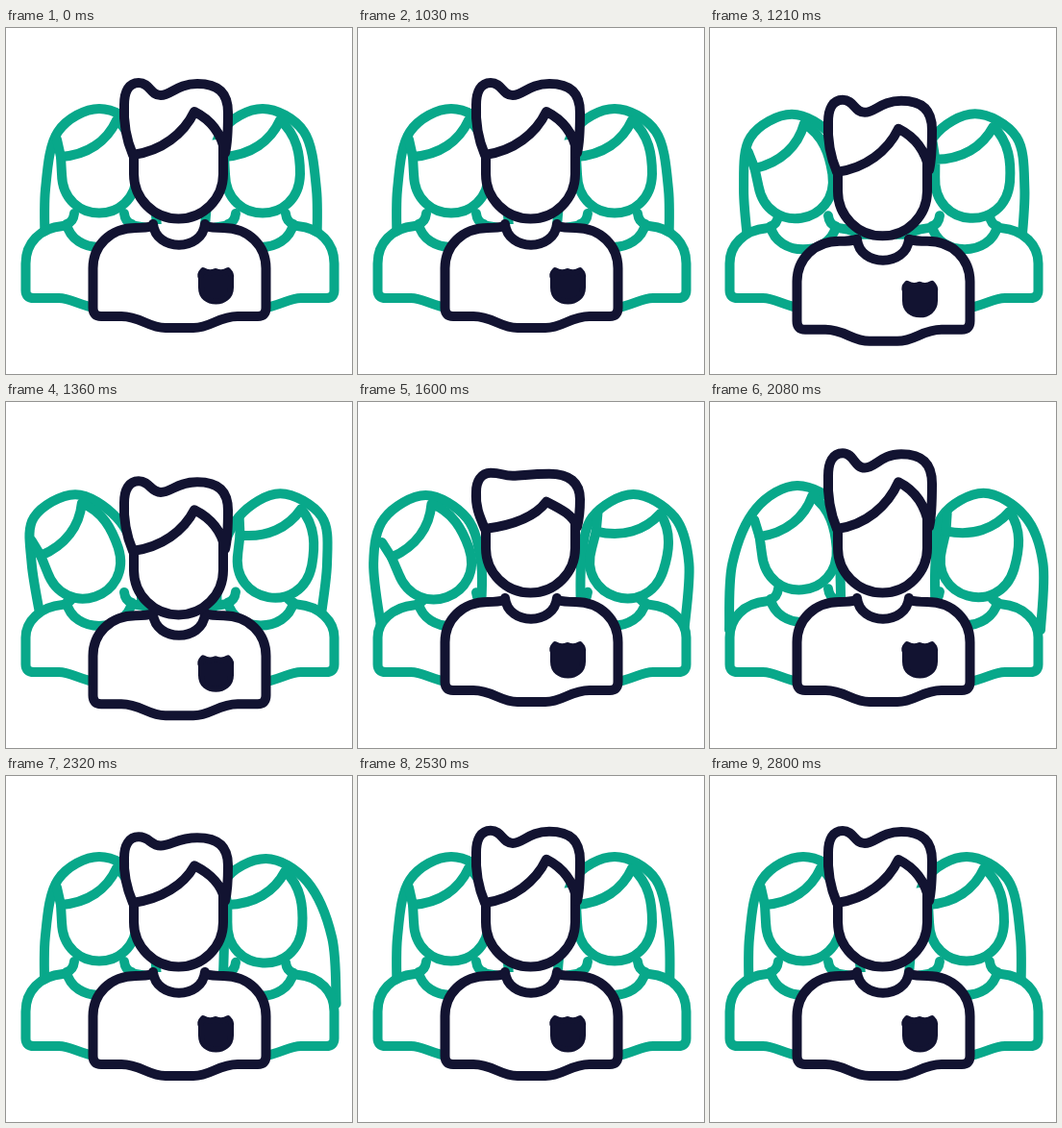
Animation of 360 by 360 pixels, one loop 2.83 s. Source, as an HTML page with a canvas:

```html
<!DOCTYPE html>
<html lang="en">
<head>
<meta charset="utf-8">
<title>Team</title>
<style>
  html, body { margin: 0; width: 100%; height: 100%; overflow: hidden; background: #fff; }
  canvas { display: block; width: 360px; height: 360px; }
</style>
</head>
<body>
<canvas id="stage"></canvas>
<script>
const LOOP = 2830, START = 1030, GREEN = '#08a88a', DARK = '#121331';
const canvas = document.getElementById('stage');
const ctx = canvas.getContext('2d');
const ratio = window.devicePixelRatio || 1;
canvas.width = canvas.height = 360 * ratio;

const path = d => new Path2D(d);

// Smooth step from 0 to 1 between two times
function ease(t, from, to) {
  const u = Math.min(1, Math.max(0, (t - from) / (to - from)));
  return u * u * (3 - 2 * u);
}

// Out and back again
const swing = (t, a, b, c, d) => ease(t, a, b) - ease(t, c, d);

function at(x, y, draw) {
  ctx.save();
  ctx.translate(x, y);
  draw();
  ctx.restore();
}

function line(p, color) {
  ctx.strokeStyle = color;
  ctx.stroke(p);
}

function shape(p, color) {
  ctx.fillStyle = '#fff';
  ctx.fill(p);
  line(p, color);
}

// Smooth curve through points
function spline(pts) {
  const s = new Path2D();
  const pt = i => pts[Math.min(pts.length - 1, Math.max(0, i))];
  s.moveTo(...pts[0]);
  for (let i = 0; i < pts.length - 1; i++) {
    const [a, b, c, d] = [pt(i - 1), pt(i), pt(i + 1), pt(i + 2)];
    const lead = n => b[n] + (c[n] - a[n]) / 6;
    const tail = n => c[n] - (d[n] - b[n]) / 6;
    s.bezierCurveTo(lead(0), lead(1), tail(0), tail(1), ...c);
  }
  return s;
}

const women = [
  { centre: 97, body: 97, side: -1, dx: -19, dy: 13, turn: -20, turnTime: 390, back: 1770 },
  { centre: 267, body: 265, side: 1, dx: 14, dy: 12, turn: 18, turnTime: 620, back: 1990 }
];
const face = path('M-40 -16L-39 2C-38 56 38 56 39 2C39 -18 36 -39 18 -54C8 -32 -12 -18 -40 -16Z');
const temple = path('M-40 -16L-44 -34');

// Body around x = 0; the shoulders sink with the head
function womanBody(sag) {
  const y = 206 + sag;
  const half = k => `C${k * 62} ${y + 2} ${k * 76.5} ${y + 18} ${k * 76.5} 245`;
  return path(`M-38 ${y}${half(-1)}V273Q-76.5 281 -68 281H-42C-29 281 -21 289 0 292` +
    `C21 289 29 281 42 281H68Q76.5 281 76.5 273V245C76.5 ${y + 18} 62 ${y + 2} 38 ${y}`);
}

const womanCollar = path('M-26 193Q-27 202 -34 204C-27 236 27 236 34 204Q27 202 26 193');

function hair(w, dx, dy, drag) {
  const sway = dx + drag;
  const strand = k => {
    const outer = k === w.side;
    return [
      [w.centre + k * (outer ? 56 : 61) + (outer ? drag : 0.85 * sway), outer ? 237 : 220],
      [w.centre + k * 56 + 0.7 * sway, 168],
      [w.centre + k * 43 + 1.4 * dx, 108 + dy]
    ];
  };
  return spline([...strand(-1), [w.centre + 1.4 * dx, 84 + dy], ...strand(1).reverse()]);
}

function woman(w, t) {
  const home = w.back + 450;
  const lean = swing(t, START, START + 390, w.back, home);
  const turn = w.turn * swing(t, START, START + w.turnTime, w.back, home);
  const drag = w.side * 21 * swing(t, 1250, 1750, w.back + 310, w.back + 570);
  const dx = w.dx * lean, dy = w.dy * lean, sag = dy * 0.4;
  shape(hair(w, dx, dy, drag), GREEN);
  at(w.body, 0, () => shape(womanBody(sag), GREEN));
  at(w.body, sag, () => shape(womanCollar, GREEN));
  at(w.centre + dx, 150 + dy, () => {
    ctx.rotate(turn * Math.PI / 180);
    shape(face, GREEN);
    line(temple, GREEN);
  });
}

const manBody = path('M153 206Q146 208 135 208C108 208 90.5 227 90.5 250V291Q90.5 300 99 300H120' +
  'C140 300 148 312 166 312H195C213 312 221 300 241 300H262Q270.5 300 270.5 291V250' +
  'C270.5 227 253 208 226 208Q214 208 207 206');
const manCollar = path('M153 204C156 233 204 233 207 204');
const manFace = path('M133 128V152A46.5 46.5 0 0 0 226 152V115');
const badge = path('M205 252Q211 256 218 253Q225 256 231 252Q235 256 234 260V270' +
  'C234 280 226 284.5 218.500 284.5C210 284.5 203 280 203 270V260Q201 256 205 252Z');

function manHair(q) {
  const y = (v, weight = 1) => v + q * weight;
  const top = y(57), dip = y(70, 0.4), hump = y(58);
  return path(`M132 132C126 118 122 ${y(100, 0.5)} 123 ${y(80, 0.8)}C123 ${y(66)} 128 ${top} 138 ${top}` +
    `C150 ${top} 150 ${dip} 161 ${dip}C172 ${dip} 178 ${hump} 199 ${hump}` +
    `C220 ${hump} 231 ${y(67)} 231 ${y(88, 0.8)}C231 ${y(105, 0.4)} 231 118 228 130` +
    `C224 ${y(108, 0.6)} 212 ${y(95)} 196 ${y(87)}C185 ${y(110, 0.5)} 162 128 132 132Z`);
}

// The quiff is squashed by the nod, then springs and settles
function quiffAt(t) {
  const since = Math.max(0, t - 1570);
  const spring = Math.cos(since / 375 * Math.PI) * Math.exp(-since / 720);
  return 18 * spring * swing(t, 1300, 1570, 2320, 2650);
}

function man(t) {
  const bodyY = 17 * swing(t, START, 1280, 1280, 1600);
  const headY = 25 * swing(t, START, 1310, 1310, 1600);
  at(0, bodyY, () => {
    shape(manBody, DARK);
    at(0, headY * 0.12, () => shape(manCollar, DARK));
    ctx.fillStyle = DARK;
    ctx.lineWidth = 6;
    ctx.fill(badge);
    line(badge, DARK);
  });
  at(0, headY, () => {
    shape(manFace, DARK);
    shape(manHair(quiffAt(t)), DARK);
  });
}

function draw(t) {
  ctx.setTransform(ratio, 0, 0, ratio, 0, 0);
  ctx.fillStyle = '#fff';
  ctx.fillRect(0, 0, 360, 360);
  ctx.lineCap = ctx.lineJoin = 'round';
  ctx.lineWidth = 10;
  women.forEach(w => woman(w, t));
  man(t);
}

const begin = performance.now();
function tick() {
  draw((performance.now() - begin) % LOOP);
  requestAnimationFrame(tick);
}
tick();
</script>
</body>
</html>
```
